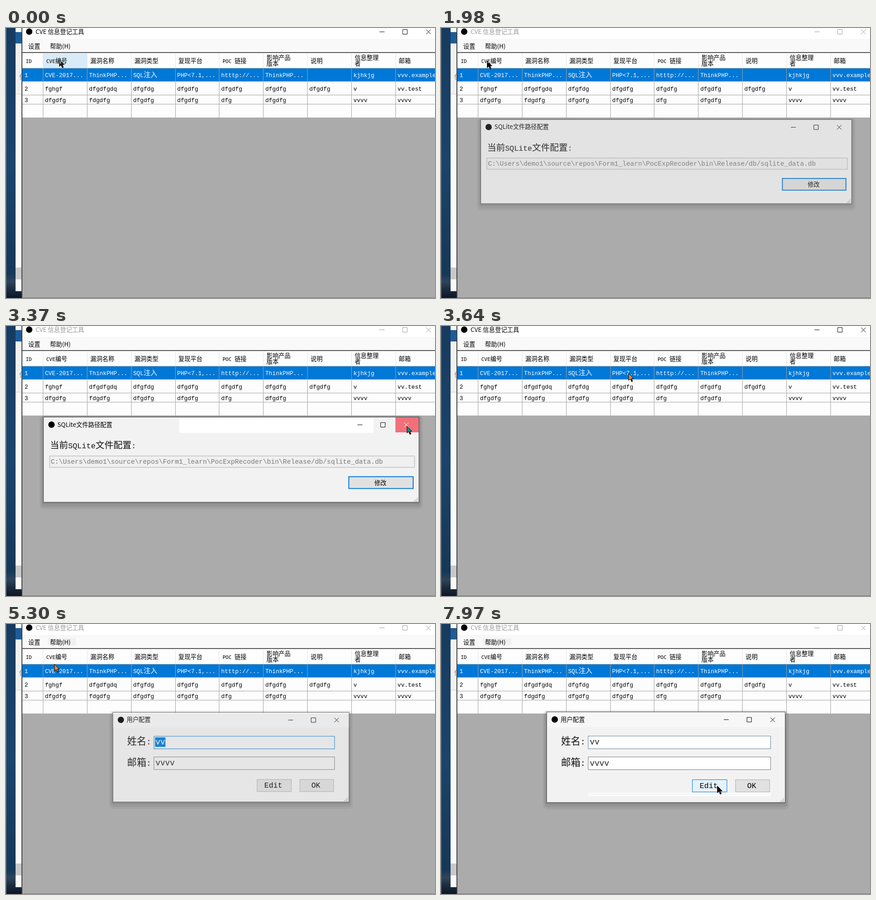
These frames come from a looping animation (943x594 px, 8 s). An HTML page:

```html
<!DOCTYPE html>
<html lang="zh-CN">
<head>
<meta charset="utf-8">
<title>CVE 信息登记工具</title>
<style>
  html, body { margin: 0; width: 100%; height: 100%; overflow: hidden; background: #ababab; }
  svg { display: block; }
  text { white-space: pre; }
  .ui { font-family: "Noto Sans CJK SC", "Noto Sans CJK", sans-serif; }
  .head { font-family: "DejaVu Sans Mono", monospace; }
  .mono { font-family: "Liberation Mono", monospace; }
  .han { font-family: "Noto Sans CJK SC", "Noto Sans CJK", sans-serif; }
  .invert { mix-blend-mode: difference; }
</style>
</head>
<body>
<svg id="stage" width="943" height="594" viewBox="0 0 943 594">
  <defs>
    <linearGradient id="sky" x2="0" y2="1">
      <stop offset="0" stop-color="#173b60"/>
      <stop offset=".5" stop-color="#1b446c"/>
      <stop offset=".91" stop-color="#163757"/>
      <stop offset=".94" stop-color="#30455a"/>
      <stop offset=".97" stop-color="#1a2a3c"/>
      <stop offset="1" stop-color="#0c1728"/>
    </linearGradient>
  </defs>
</svg>
<script>
const LOOP = 8000;
const BLUE = '#0078d7';
const stage = document.getElementById('stage');

function make(parent, tag, attrs = {}) {
  const el = document.createElementNS('http://www.w3.org/2000/svg', tag);
  for (const key in attrs) el.setAttribute(key, attrs[key]);
  parent.append(el);
  return el;
}
const group = (parent = stage) => make(parent, 'g');
const rect = (p, x, y, width, height, fill, more) =>
  make(p, 'rect', { x, y, width, height, fill, ...more });
const frame = (p, x, y, w, h, fill, stroke, weight = 1) =>
  rect(p, x + weight / 2, y + weight / 2, w - weight, h - weight, fill, { stroke, 'stroke-width': weight });
const path = (p, d, stroke, more) => make(p, 'path', { d, stroke, fill: 'none', ...more });

// Chinese runs may have a size of their own beside Latin ones.
function text(p, x, y, string, style, size, fill = '#000', hanSize = size, anchor = 'start') {
  const el = make(p, 'text', { x, y, class: style, 'font-size': size, fill, 'text-anchor': anchor });
  for (const run of string.match(/[\u4e00-\u9fff]+|[^\u4e00-\u9fff]+/g)) {
    const han = run.charCodeAt(0) >= 0x4e00;
    make(el, 'tspan', han ? { class: 'han', 'font-size': hanSize } : {}).textContent = run;
  }
  return el;
}
const ui = (p, x, y, s, fill) => text(p, x, y, s, 'ui', 13.4, fill, 13.3);

// Minimise, maximise and close signs
function controls(p, x, y, gap) {
  const right = x + 2 * gap;
  return [
    path(p, `M${x - 5.5},${y}h11`, '#000'),
    path(p, `M${x + gap - 5.5},${y - 5}h10v10h-10z`, '#000'),
    path(p, `M${right - 5},${y - 5}l10,10m0,-10l-10,10`, '#000')
  ];
}
const show = (el, on) => el.setAttribute('visibility', on ? 'visible' : 'hidden');
const between = (t, from, to) => t >= from && t < to;

// Desktop and the window behind
rect(stage, 0, 0, 943, 594, 'url(#sky)');
rect(stage, 0, 0, 1, 594, '#5b7187');
rect(stage, 21, 0, 14, 579, '#fafafa');
rect(stage, 21, 9, 14, 25, '#1e5c96');
rect(stage, 21, 34, 14, 111, '#f1f1f1');
rect(stage, 21, 145, 14, 1, '#cfcfcf');
rect(stage, 21, 527, 14, 26, '#c8c8c8');
ui(stage, 29, 112, '位', '#777');

// Main window
rect(stage, 34, 0, 909, 594, '#ababab');
rect(stage, 35, 0, 908, 26, '#fff');
rect(stage, 35, 25, 908, 1, '#f0f0f0');
rect(stage, 35, 26, 908, 28, '#f9f9f9');
make(stage, 'circle', { cx: 51, cy: 8, r: 7 });
const mainTitle = ui(stage, 65, 13.2, 'CVE 信息登记工具');
const mainControls = controls(stage, 826.5, 8.5, 51);
const helpShade = rect(stage, 92, 31, 62, 16, '#f0f0f0');
const menuTab = group();
frame(menuTab, 38, 28, 49, 24, '#f8f8f8', '#808080');
ui(stage, 48.7, 44.5, '设置');
ui(stage, 96.7, 44.5, '帮助(H)');

// Table
const column = i => i ? 82 + (i - 1) * 96.85 : 37;
const headings = ['ID', 'CVE编号', '漏洞名称', '漏洞类型', '复现平台', 'POC 链接',
  '影响产品/版本', '说明', '信息整理/者', '邮箱'];
const rows = [
  [108, '#fff', ['1', 'CVE-2017...', 'ThinkPHP...', 'SQL注入', 'PHP<7.1,...', 'htttp://...',
    'ThinkPHP...', '', 'kjhkjg', 'vvv.example']],
  [137.5, '#000', ['2', 'fghgf', 'dfgdfgdq', 'dfgfdg', 'dfgdfg', 'dfgdfg', 'dfgdfg', 'dfgdfg', 'v', 'vv.test']],
  [163, '#000', ['3', 'dfgdfg', 'fdgdfg', 'dfgdfg', 'dfgdfg', 'dfg', 'dfgdfg', '', 'vvvv', 'vvvv']]
];
rect(stage, 36, 55, 907, 142, '#fdfdfd');
const headHover = rect(stage, 82, 56, 97, 32, '#d9ebf9');
rect(stage, 36, 89, 907, 28, BLUE);
for (let i = 1; i < 10; i++) {
  const x = Math.round(column(i)) - .5;
  path(stage, `M${x},56V88`, '#e5e5e5');
  path(stage, `M${x},89V197`, '#a0a0a0');
}
path(stage, 'M36,88.5H943M36,117.5H943M36,147.5H943M36,167.5H943', '#a0a0a0');
rect(stage, 34, 53, 909, 2, '#555');
rect(stage, 34, 0, 2, 594, '#444');
rect(stage, 35, 593, 908, 1, '#777');
headings.forEach((heading, i) => {
  const lines = heading.split('/');
  lines.forEach((line, n) =>
    text(stage, column(i) + 6.5, lines.length > 1 ? 70 + n * 13 : 76.5, line, 'head', 11, '#000', 13.2));
});
for (const [y, fill, cells] of rows)
  cells.forEach((cell, i) => cell && text(stage, column(i) + 3.7, y, cell, 'mono', 12.8, fill, 15));

// Drop-down menu
const menu = group();
rect(menu, 44, 54, 178, 54, '#000', { opacity: .12 });
rect(menu, 42, 52, 178, 54, '#000', { opacity: .25 });
frame(menu, 39, 50, 178, 53, '#f5f5f5', '#8a8a8a');
rect(menu, 40, 50, 46, 1, '#f8f8f8');
const itemHover = [52, 76].map(y => frame(menu, 42, y, 173, 24, '#b3d7f3', BLUE));
ui(menu, 78.7, 68.7, 'SQLite文件配置');
ui(menu, 78.7, 92.7, '用户配置');

function dialog(x, y, w, h, title, barFill) {
  const g = group();
  rect(g, x - 8, y - 4, w + 16, h + 19, '#000', { rx: 9, opacity: .05 });
  rect(g, x - 5, y - 2, w + 10, h + 12, '#000', { rx: 7, opacity: .07 });
  rect(g, x - 2, y - 1, w + 4, h + 5, '#000', { rx: 4, opacity: .1 });
  frame(g, x, y, w, h, '#f2f2f2', '#585858');
  rect(g, x + 1, y + 1, w - 2, 33, barFill);
  make(g, 'circle', { cx: x + 18, cy: y + 17, r: 7 });
  ui(g, x + 31, y + 21.5, title);
  for (let i = 0; i < 3; i++)
    for (let j = 0; j <= i; j++)
      rect(g, x + w - 11 + i * 3, y + h - 4 - j * 3, 2, 2, '#b5b5b5');
  return { g, cx: x + w / 2, cy: y + h / 2 };
}
function pose({ g, cx, cy }, opacity, scale) {
  show(g, opacity > 0);
  g.setAttribute('opacity', opacity);
  g.setAttribute('transform', `translate(${cx} ${cy}) scale(${scale}) translate(${-cx} ${-cy})`);
}

// File path dialog
const fileBox = dialog(82, 200, 826, 188, 'SQLite文件路径配置', '#f2f2f2');
const fileBar = rect(fileBox.g, 381, 202, 427, 33, '#fff');
const closeHover = rect(fileBox.g, 856, 201, 51, 33, '#f1707a');
const [, , closeCross] = controls(fileBox.g, 778, 217.5, 51);
text(fileBox.g, 97, 269.3, '当前SQLite文件配置:', 'mono', 16.7, '#111', 19.8);
frame(fileBox.g, 95, 285, 804, 27, '#f0f0f0', '#cccccc', 2);
text(fileBox.g, 98.5, 303, 'C:\\Users\\demo1\\source\\repos\\Form1_learn\\PocExpRecoder\\bin\\Release/db/sqlite_data.db',
  'mono', 14.66, '#777');
frame(fileBox.g, 752.5, 330.5, 143.5, 28, '#e1e1e1', BLUE, 2);
text(fileBox.g, 823, 349.5, '修改', 'ui', 13.3, '#000', 13.3, 'middle');

// User dialog
const userBox = dialog(232, 193, 525, 200, '用户配置', '#f7f7f7');
controls(userBox.g, 627, 210.5, 51);
text(userBox.g, 264, 264.5, '姓名:', 'mono', 18, '#111', 21.3);
text(userBox.g, 264, 312, '邮箱:', 'mono', 18, '#111', 21.3);
const nameField = frame(userBox.g, 323, 246, 402, 29, '#f2f2f2', BLUE);
const mailField = frame(userBox.g, 323, 292, 402, 29, '#f2f2f2', '#7a7a7a');
const selection = rect(userBox.g, 326, 249, 23, 21, BLUE);
const nameText = text(userBox.g, 327, 265, 'vv', 'mono', 17.8);
text(userBox.g, 327, 311.5, 'vvvv', 'mono', 17.8, '#222');
const whiteLines = group(userBox.g);
rect(whiteLines, 323, 371.5, 402, 2, '#fff');
rect(whiteLines, 323, 375.5, 402, 3, '#fff');
const editButton = frame(userBox.g, 552, 342, 77, 28, '#e1e1e1', '#adadad');
frame(userBox.g, 647, 342, 76, 28, '#e1e1e1', '#adadad');
text(userBox.g, 588.5, 361, 'Edit', 'mono', 16.6, '#000', 16.6, 'middle');
text(userBox.g, 683, 361, 'OK', 'mono', 16.6, '#000', 16.6, 'middle');

// The pointer inverts what lies under it.
const arrowShape = 'M.5,.5V15.5L4,12.3 6.8,18.5 9.3,17.4 6.6,11.4H11z';
const pointer = [
  make(stage, 'path', { d: arrowShape, fill: '#fff', class: 'invert' }),
  path(stage, arrowShape, '#000')
];
const beam = path(stage, 'M-3,-8.5H3M0,-8.5V8.5M-3,8.5H3', '#fff', { class: 'invert' });

// time, x, y; the pointer rests until the next entry
const track = [
  [0, 117, 69], [250, 112, 66], [385, 95, 56], [520, 76, 45], [655, 66, 39], [790, 65, 37],
  [1440, 76, 52], [1590, 92, 63], [1710, 101, 72],
  [2100, 230, 180], [2220, 381, 300], [2370, 560, 375], [2510, 700, 396], [2650, 770, 368],
  [2790, 820, 310], [2940, 852, 262], [3080, 868, 238], [3220, 878, 224], [3370, 881, 220],
  [3490, 760, 190], [3640, 412, 104], [3790, 290, 78], [3940, 180, 56], [4070, 112, 41],
  [4200, 76, 39], [4330, 66, 38],
  [4610, 72, 50], [4740, 88, 68], [4870, 100, 82], [5000, 106, 88],
  [5420, 240, 165], [5540, 470, 306], [5690, 570, 306], [5810, 631, 306], [6090, 352, 258],
  [6400, 450, 302], [6520, 545, 328], [6640, 590, 347], [6760, 603, 354], [6880, 607, 356]
];

function draw(t) {
  const [, x, y] = track.findLast(stop => stop[0] <= t);
  const isBeam = between(t, 5540, 6520);
  for (const el of [...pointer, beam]) el.setAttribute('transform', `translate(${x} ${y})`);
  pointer.forEach(el => show(el, !isBeam));
  show(beam, isBeam);

  const menuOpen = between(t, 655, 1860) || between(t, 4460, 5180);
  show(headHover, t < 250);
  show(menu, menuOpen);
  show(menuTab, menuOpen);
  itemHover.forEach((el, i) => el.style.display =
    menuOpen && y >= 54 + i * 24 && y < 76 + i * 24 ? '' : 'none');
  show(helpShade, t >= 4070);

  const modal = between(t, 1860, 3490) || t >= 5180;
  const mainInk = modal ? '#999' : '#000';
  mainTitle.setAttribute('fill', mainInk);
  mainControls.forEach(el => el.setAttribute('stroke', mainInk));

  if (between(t, 1860, 1980)) pose(fileBox, .3, .95);
  else if (between(t, 1980, 2100)) pose(fileBox, .79, .988);
  else if (between(t, 2100, 3490)) pose(fileBox, 1, 1);
  else if (between(t, 3490, 3640)) pose(fileBox, .45, .96);
  else pose(fileBox, 0, 1);
  const closing = between(t, 3220, 3640);
  fileBar.style.display = t >= 2370 ? '' : 'none';
  closeHover.style.display = closing ? '' : 'none';
  closeCross.setAttribute('stroke', closing ? '#fff' : '#000');

  if (t < 5180) pose(userBox, 0, 1);
  else if (t < 5300) pose(userBox, .35, .95);
  else if (t < 5420) pose(userBox, .83, .99);
  else pose(userBox, 1, 1);

  const editable = t >= 7150;
  const selected = t < 6090;
  selection.style.display = selected ? '' : 'none';
  nameText.setAttribute('fill', selected ? '#fff' : '#222');
  whiteLines.style.display = editable ? '' : 'none';
  for (const field of [nameField, mailField]) field.setAttribute('fill', editable ? '#fff' : '#f2f2f2');
  nameField.setAttribute('stroke', editable ? '#6b8096' : BLUE);
  mailField.setAttribute('stroke', between(t, 5690, 6090) ? '#333' : '#7a7a7a');
  const hot = t >= 6640;
  editButton.setAttribute('fill', hot ? '#e5f1fb' : '#e1e1e1');
  editButton.setAttribute('stroke', hot ? BLUE : '#adadad');
}

const start = performance.now();
function tick() {
  draw((performance.now() - start) % LOOP);
  requestAnimationFrame(tick);
}
draw(0);
requestAnimationFrame(tick);
</script>
</body>
</html>
```
